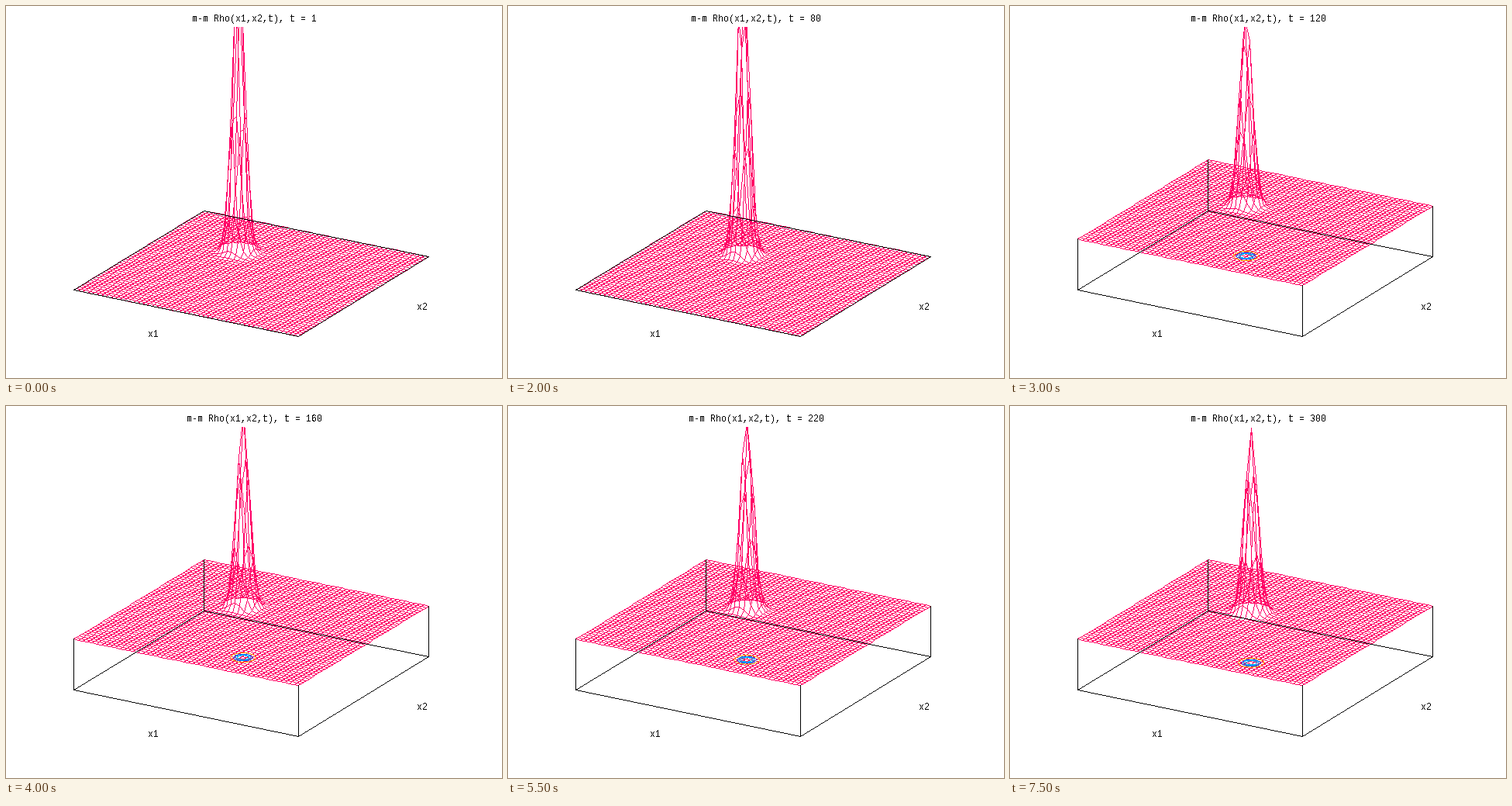
Write a matplotlib script that moves like this. It is 640 px wide and 480 px high and loops after 8000 ms.

```python
import numpy as np
import matplotlib.pyplot as plt
from matplotlib.animation import FuncAnimation

plt.rcParams["text.antialiased"] = False
W, H, DPI = 640, 480, 80
N = 50                 # grid points per side
LIFT = 65.5            # surface height above the base once contours show
ZOOM = 1.46            # taller z scale while the surface sits on the base
TOP = 27               # the plot is cut off above this row
PINK, BLACK = (255, 0, 102), (0, 0, 0)
RINGS = [(40, (255, 165, 0)), (90, (0, 102, 255)),
         (130, (0, 153, 255)), (170, (0, 191, 255))]
TIMES = [1] + list(range(20, 301, 20))

fig = plt.figure(figsize=(W / DPI, H / DPI), dpi=DPI, facecolor="white")
ax = fig.add_axes([0, 0, 1, 1])
ax.axis("off")
blank = np.full((H, W, 3), 255, np.uint8)
image = ax.imshow(blank, extent=(0, W, H, 0), aspect="auto",
                  interpolation="nearest")


def project(u, v, z=0):
    """Unit-square floor position and height to screen pixels."""
    return np.stack([87 + 290 * u + 168 * v,
                     366 + 59.5 * u - 102.5 * v - z], axis=-1)


def stroke(canvas, points, color):
    """One-pixel polylines; the last two axes of points are vertex and x, y."""
    points = np.rint(points)
    a = points[..., :-1, :].reshape(-1, 1, 2)
    d = points[..., 1:, :].reshape(-1, 1, 2) - a
    steps = np.maximum(np.abs(d).max(axis=-1, keepdims=True), 1)
    k = np.arange(int(steps.max()) + 1).reshape(1, -1, 1)
    p = np.floor(a + d * np.minimum(k / steps, 1) + 0.5).astype(int)
    x, y = p[p[..., 1] >= TOP].T
    canvas[y, x] = color


def label(x, y, s):
    return ax.text(x, y, s, family="Liberation Mono", size=11.67 * 72 / DPI,
                   ha="center", va="baseline", color="black")


I, J = np.meshgrid(np.arange(N), np.arange(N), indexing="ij")
FLOOR = project(np.array([0, 1, 1, 0, 0]), np.array([0, 0, 1, 1, 0]))
POSTS = np.stack([FLOOR, FLOOR - [0, LIFT]], axis=1)
ANGLES = np.linspace(0, 2 * np.pi, 25)

title = label(320.5, 20, "")
label(190.5, 427, "x1")
label(537.5, 392, "x2")


def packet(t):
    """Centre, peak height and variance of the drifting, spreading Gaussian."""
    spread = 1 + (t / 1023) ** 2
    ci = 16.55 + 0.0148 * t
    return ci, 50 - ci, 258 / spread, 1.5 * spread


def draw(i):
    t = TIMES[i]
    raised = t >= 100
    ci, cj, peak, var = packet(t)
    z = peak * np.exp(-((I - ci) ** 2 + (J - cj) ** 2) / (2 * var))
    z = z + LIFT if raised else z * ZOOM

    canvas = blank.copy()
    mesh = project(I / (N - 1), J / (N - 1), z)
    stroke(canvas, mesh, PINK)
    stroke(canvas, mesh.swapaxes(0, 1), PINK)
    stroke(canvas, FLOOR, BLACK)
    if raised:
        stroke(canvas, POSTS, BLACK)
        for level, color in RINGS:
            r = np.sqrt(2 * var * np.log(peak / level))
            ring = project((ci + r * np.cos(ANGLES)) / (N - 1),
                           (cj + r * np.sin(ANGLES)) / (N - 1))
            stroke(canvas, ring, color)

    image.set_data(canvas)
    title.set_text(f"m-m Rho(x1,x2,t), t = {t}")
    return [image, title]


anim = FuncAnimation(fig, draw, frames=len(TIMES), interval=500,
                     repeat=True, repeat_delay=0, blit=False)
plt.show()
```
